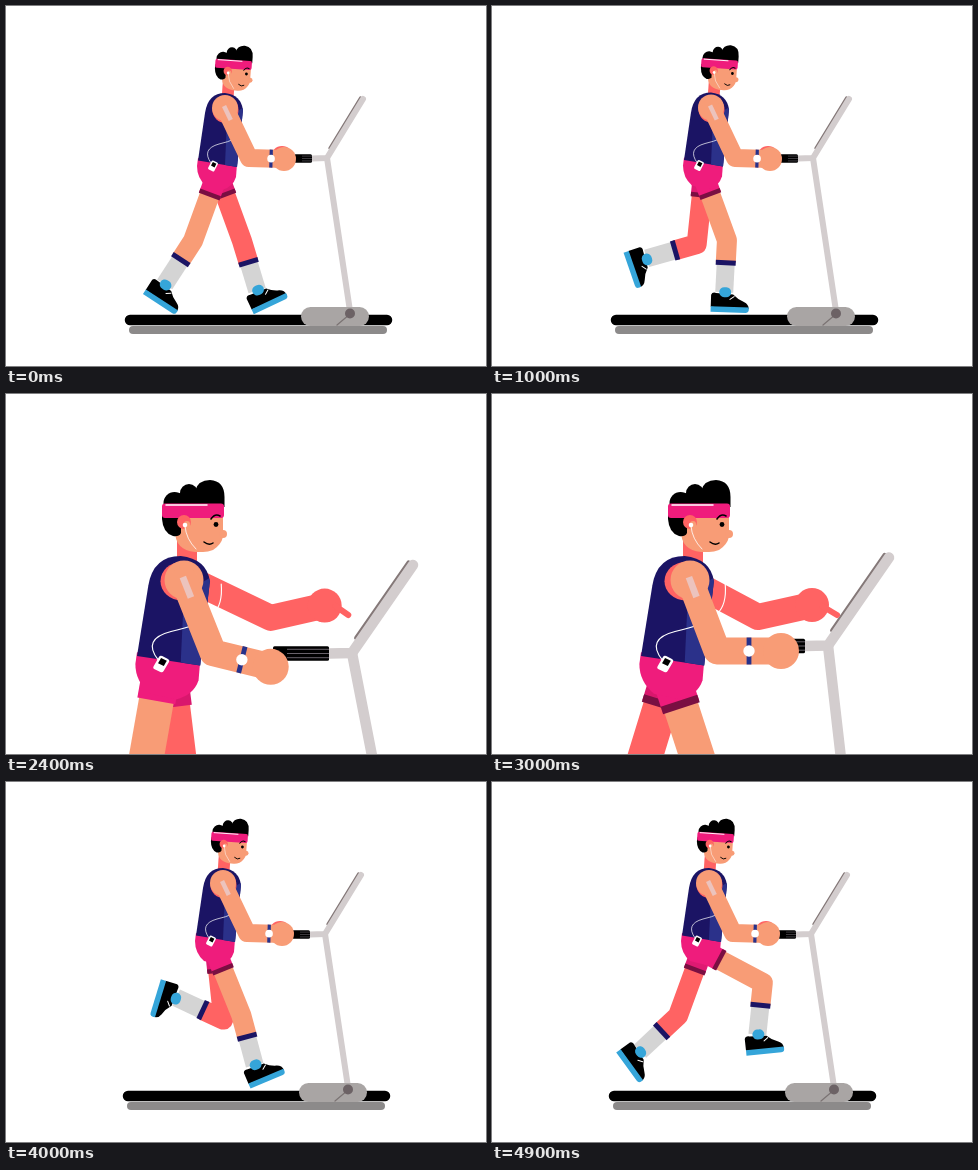
Write an HTML page with a canvas that moves like this. It is 480 px wide and 360 px high and loops after 5 s.

```html
<!DOCTYPE html>
<html>
<head>
<meta charset="utf-8">
<title>Treadmill</title>
<style>
html, body { margin: 0; width: 100%; height: 100%; overflow: hidden; background: #fff; }
canvas { display: block; }
</style>
</head>
<body>
<canvas id="stage" width="480" height="360"></canvas>
<script>
const c = document.getElementById('stage').getContext('2d');
const SKIN = '#f89c76', FAR = '#ff6363', PINK = '#ef1c7c', HEM = '#7a0f42', NAVY = '#1b1464',
  BLUE = '#35a5d9', STEEL = '#d3cdce', SOCK = '#d4d4d4', BLACK = '#000', WHITE = '#fff';

// Evenly spaced poses of one leg over a cycle: [thigh, shin, foot] in degrees, positive leans back
const WALK = [[20, 33, 33], [6, 74, 71], [-15, 62, 56], [-28, 15, 12],
  [-20, -17, -25], [-20, 3, 2], [-10, 8, 0], [8, 18, 10]];
const RUN = [[22, 80, 80], [10, 106, 102], [-6, 115, 107], [-30, 100, 92], [-51, 62, 60], [-62, 6, -6],
  [-52, -18, -25], [-36, -20, -28], [-22, -15, -23], [-14, 4, 0], [3, 32, 27], [20, 47, 54]];

const mix = (a, b, k) => a + (b - a) * k;
const mixAll = (a, b, k) => a.map((v, i) => mix(v, b[i], k));
const smooth = x => { x = Math.min(1, Math.max(0, x)); return x * x * (3 - 2 * x); };

function pose(cycle, phase) {
  const n = cycle.length, x = (phase % 1) * n, i = Math.floor(x);
  return mixAll(cycle[i % n], cycle[(i + 1) % n], x - i);
}

function line(color, width, points, cap = 'round') {
  c.strokeStyle = color;
  c.lineWidth = width;
  c.lineCap = cap;
  c.lineJoin = 'round';
  c.beginPath();
  points.forEach(p => c.lineTo(p[0], p[1]));
  c.stroke();
}
function dot(color, x, y, r) {
  c.fillStyle = color;
  c.beginPath();
  c.arc(x, y, r, 0, 7);
  c.fill();
}
function box(color, x, y, w, h, r = 0) {
  c.fillStyle = color;
  c.beginPath();
  c.roundRect(x, y, w, h, r);
  c.fill();
}
function shape(color, d) {
  c.fillStyle = color;
  c.fill(new Path2D(d));
}
function curve(color, width, d) {
  c.strokeStyle = color;
  c.lineWidth = width;
  c.lineCap = 'round';
  c.stroke(new Path2D(d));
}
function placed(x, y, angle, sx, sy, draw) {
  c.save();
  c.translate(x, y);
  c.rotate(angle * Math.PI / 180);
  c.scale(sx, sy);
  draw();
  c.restore();
}

function leg(x, y, scale, [thigh, shin, foot], skin, shorts, hem) {
  const reach = (p, a, d) => [p[0] - Math.sin(a * Math.PI / 180) * d, p[1] + Math.cos(a * Math.PI / 180) * d];
  placed(x, y, 0, scale, scale, () => {
    const hip = [0, 0], knee = reach(hip, thigh, 70), ankle = reach(knee, shin, 52);
    line(skin, 20, [hip, knee, reach(knee, shin, 22)], 'butt');
    line(SOCK, 18, [reach(knee, shin, 24), ankle], 'butt');
    line(NAVY, 20, [reach(knee, shin, 20), reach(knee, shin, 25)], 'butt');
    placed(...ankle, foot, 1, 1, () => {
      shape(BLACK, 'M-13 15L-13 3Q-12 0-8 1L9 2Q14 7 20 9Q25 11 25 16Z');
      shape(BLUE, 'M-13 14.500L25 14.500Q26 20 22 20L-13 20Z');
      box(BLUE, -5, -5, 12, 10, 5);
      line(WHITE, 1, [[6, 7], [10, 4]]);
    });
    line(shorts, 22, [hip, reach(hip, thigh, 22)], 'butt');
    if (hem) line(HEM, 22, [reach(hip, thigh, 18.5), reach(hip, thigh, 23)], 'butt');
  });
}

function head(x, y, angle, sx, sy) {
  placed(x, y, angle, sx, sy, () => {
    box(FAR, -16, 25, 20, 28);
    shape(SKIN, 'M-18 0H30V26Q28 34 20 39Q15 41 10 41H2Q-18 39-18 20Z');
    dot(SKIN, 30, 23, 4);
    shape(BLACK, 'M-31 2H-12V22Q-14 26-20 25Q-30 22-31 8Z');
    dot(BLACK, -18.5, -8, 11);
    dot(BLACK, -4, -18, 9);
    shape(BLACK, 'M-29-4Q-24-18-10-18L2-20Q5-31 17-31Q31.500-30 31.500-14V-4Z');
    box(PINK, -31, -7.5, 62, 14.5, 3);
    line(WHITE, 1.5, [[-27, -6], [14, -6]]);
    dot(FAR, -9, 11, 7);
    box(SKIN, -9, 10, 6, 9, 3);
    dot(WHITE, -8, 14, 2.3);
    curve(WHITE, 0.8, 'M-8 15Q-7 28 3 38');
    curve(BLACK, 1.6, 'M18 8Q22 2 27 5');
    dot(BLACK, 23, 13.5, 2.4);
    curve(BLACK, 1.5, 'M11 31Q16 35 20 32');
  });
}

function torso(x, y, sx, sy) {
  placed(x, y, 0, sx, sy, () => {
    c.translate(-192, -87);
    shape(PINK, 'M192 152L231 158L230 171Q227 181 216 184L200 180Q191 172 191 160Z');
    shape(NAVY, 'M192 154.500L199 107Q202 87 219 87Q235 89 237 104L231 161Z');
    shape('#2b318a', 'M219 159L221 112L236.500 102L237 104L231 161Z');
    curve(WHITE, 0.7, 'M205 157Q195 143 213 138Q231 134 239 126Q245 120 244 106');
    dot(FAR, 219.5, 104, 13);
    placed(207, 160, 28, 1, 1, () => {
      box(WHITE, -3.5, -5, 7, 10, 1.5);
      box(BLACK, -2, -3.5, 4, 4);
    });
  });
}

function nearArm(shoulder, elbow, hand, watch, s) {
  const wrist = mixAll(elbow, hand, watch), dx = hand[0] - elbow[0], dy = hand[1] - elbow[1];
  const len = Math.hypot(dx, dy), nx = -dy / len * 9 * s, ny = dx / len * 9 * s;
  dot(SKIN, ...shoulder, 13 * s);
  line(SKIN, 18 * s, [shoulder, elbow, hand]);
  dot(SKIN, ...hand, 12 * s);
  line('#ecc3bd', 4.5 * s, [mixAll(shoulder, elbow, -0.04), mixAll(shoulder, elbow, 0.24)], 'butt');
  line('#26318a', 3.2 * s, [[wrist[0] - nx, wrist[1] - ny], [wrist[0] + nx, wrist[1] + ny]], 'butt');
  dot(WHITE, ...wrist, 3.8 * s);
}

function stand(grip, end, bend, top, foot, s) {
  line(STEEL, 6 * s, [bend, foot]);
  const side = p => [p[0] - 2.5 * s, p[1] - 1.5 * s];
  line('#847878', 2.4 * s, [side(mixAll(bend, top, 0.14)), side(top)]);
  line(STEEL, 6 * s, [end, bend, top]);
  box(BLACK, grip[0], grip[1] - 4.2 * s, end[0] - grip[0], 8.4 * s, 1.5);
  for (let i = -1; i < 2; i++) {
    line('#77707a', 0.5 * s, [[grip[0] + 8 * s, grip[1] + i * 2.4 * s], [end[0], grip[1] + i * 2.4 * s]], 'butt');
  }
}

function wideShot(cycle, phase, x, y, bob, headX, headY) {
  placed(x, 0, 0, 1, 1, () => {
    line('#8c8a8a', 8, [[127, 324], [377, 324]]);
    line(BLACK, 10.5, [[124, 314], [381, 314]]);
    stand([288, 152.5], [306, 152.5], [321, 152], [357, 93], [344, 305], 1);
    box('#a9a5a4', 295, 301, 68, 19, 9.5);
    line('#7b7373', 1.2, [[344, 308], [331, 319]]);
    dot('#6c6265', 344, 307.5, 5);
  });
  placed(x, y - bob, 0, 1, 1, () => {
    dot(FAR, 276, 151 + bob, 11);
    leg(212, 169, 1, pose(cycle, phase + 0.5), FAR, '#df1a72', true);
    leg(211, 169, 1, pose(cycle, phase), SKIN, PINK, true);
    head(headX, headY, 4, 0.59, 0.63);
    torso(192, 87, 1, 1);
    nearArm([219, 102], [243, 152 + bob], [278, 153 + bob], 0.63, 1);
  });
}

function closeShot(t) {
  const step = smooth((t - 2500) / 500), reach = smooth((t - 1800) / 1000), tap = smooth((t - 1800) / 700);
  const shift = 18 * step;
  placed(-10 * step, -7.5 * step, 0, 1, 1, () =>
    stand([267, 259.5], [323, 259.5], [346, 259], [407, 171], [368 - 9 * step, 372], 1.75));

  const elbow = mixAll([243, 239], [266, 223], tap), hand = mixAll([296, 222], [320, 211], tap);
  line(FAR, 26, [mixAll([194, 190], [206, 191], step), elbow, hand]);
  dot(FAR, ...hand, 17);
  line(FAR, 6, [mixAll(hand, [330, 212], tap), mixAll([296, 222], [345, 221], tap)]);

  const walking = t >= 2600;
  leg(162 + shift, 275, 1.75, mixAll([-7, 0, 0], [17, 20, 0], step), FAR, '#d9176d', walking);
  leg(157 + 20 * step, 269 + 7 * step, 1.75, mixAll([10, 10, 0], [-18, -18, 0], step), SKIN, PINK, walking);
  head(187 + 20 * step, 117, 0, 1, 1);
  torso(131 + shift, 162, 1.62, 1.48);
  nearArm([178 + 20 * step, 186], mixAll([174, 262], [225, 257], reach),
    mixAll([220, 302], [289, 257], reach), 0.5, 1.5);
}

function draw() {
  const now = performance.now() % 5000, beat = now < 3200 ? 200 : 100;
  const t = Math.floor(now / beat) * beat;
  c.fillStyle = WHITE;
  c.fillRect(0, 0, 480, 360);
  if (t < 1800) {
    const phase = t / 1600;
    wideShot(WALK, phase, 0, 0, 0.5 - 0.5 * Math.cos(phase * 4 * Math.PI), 227.5, 58.5);
  } else if (t < 3200) {
    closeShot(t);
  } else {
    const phase = (t - 3200) / 1200;
    wideShot(RUN, phase, -2, -1, 2 * Math.max(0, Math.cos((phase - 0.1) * 2 * Math.PI)), 225.5, 56.5);
  }
  requestAnimationFrame(draw);
}
draw();
</script>
</body>
</html>
```
